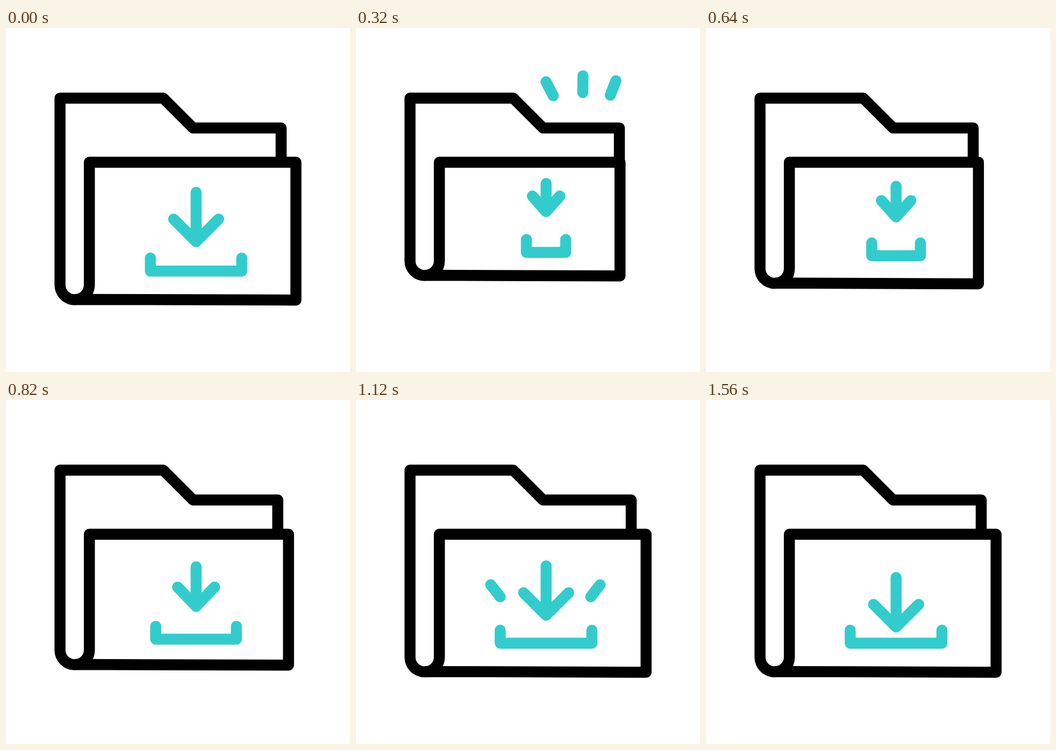
An HTML page for the animation above (2400 ms loop, 640 by 640 pixels).

```html
<!DOCTYPE html>
<html lang="en">
<head>
<meta charset="utf-8">
<title>Folder download</title>
<style>
  html, body { margin: 0; width: 100%; height: 100%; overflow: hidden; background: #fff; }
  svg { display: block; width: 100%; height: 100%; }
  path { fill: none; stroke-width: 20.5; stroke-linejoin: round; }
  #accent { stroke: #3cc; stroke-linecap: round; }
</style>
</head>
<body>
<svg viewBox="0 0 640 640">
  <path id="folder" stroke="#000"/>
  <path id="accent"/>
</svg>
<script>
const LOOP = 2400;
const folder = document.getElementById('folder');
const accent = document.getElementById('accent');

const ramp = (t, from, to) => Math.min(1, Math.max(0, (t - from) / (to - from)));
const easeOut = (x, power) => 1 - (1 - x) ** power;
const smooth = x => x * x * (3 - 2 * x);
const mix = (a, b, k) => a + (b - a) * k;

// Each spark: base x, base y, reach x, reach y
const topSparks = [[383.5, 158, -30, -58], [421.5, 158, 0.8, -69], [460.5, 158, 23, -60]];
const traySparks = [[268.3, 366.2, -17.6, -22.5], [436.7, 366.2, 17.3, -22.5]];

// The tip shoots out first, then the base catches up with it
const drawSparks = (sparks, head, tail) => head <= 0 || tail >= 1 ? '' :
  sparks.map(([x, y, dx, dy]) =>
    `M${x + dx * tail} ${y + dy * tail}L${x + dx * head} ${y + dy * head}`).join('');

function drawFolder(squeeze) {
  const back = mix(512, 490, squeeze);
  const right = mix(539.7, 491.2, squeeze);
  const bottom = mix(506.5, 461.3, squeeze);
  folder.setAttribute('d',
    `M${back} 250V186H348L292.5 130.5H100.5V${bottom - 28.1}` +
    `a27.3 27.3 0 0 0 54.6 0V249.7H${right}V${bottom}L128 ${bottom - 1.3}`);
}

function trayPath(squeeze) {
  const half = mix(85.3, 36.6, squeeze);
  const bottom = mix(452.4, 417.6, squeeze);
  return `M${353.6 - half} ${bottom - 24.1}v24.1h${2 * half}v-24.1`;
}

function arrowPath(lift, shrink, drop) {
  const tip = mix(397.8, 341.6, lift) + 24.5 * drop;
  const half = mix(42, 25.6, shrink);
  const rise = mix(42, 29, shrink);
  return `M353.7 ${tip - mix(92, 52.3, shrink)}V${tip}` +
    `M${353.7 - half} ${tip - rise}L353.7 ${tip}l${half} ${-rise}`;
}

function draw(t) {
  const squeeze = easeOut(ramp(t, 0, 250), 1.6);
  const released = (from, to) => squeeze - smooth(ramp(t, from, to));

  drawFolder(squeeze - easeOut(ramp(t, 520, 1080), 1.6));
  accent.setAttribute('d',
    trayPath(released(530, 943)) +
    arrowPath(released(524, 963), released(520, 1090), easeOut(ramp(t, 1080, 1560), 1.3)) +
    drawSparks(topSparks, ramp(t, 70, 275), ramp(t, 200, 420)) +
    drawSparks(traySparks, ramp(t, 980, 1100), ramp(t, 1130, 1320)));
}

function tick() {
  draw(performance.now() % LOOP);
  requestAnimationFrame(tick);
}
tick();
</script>
</body>
</html>
```
